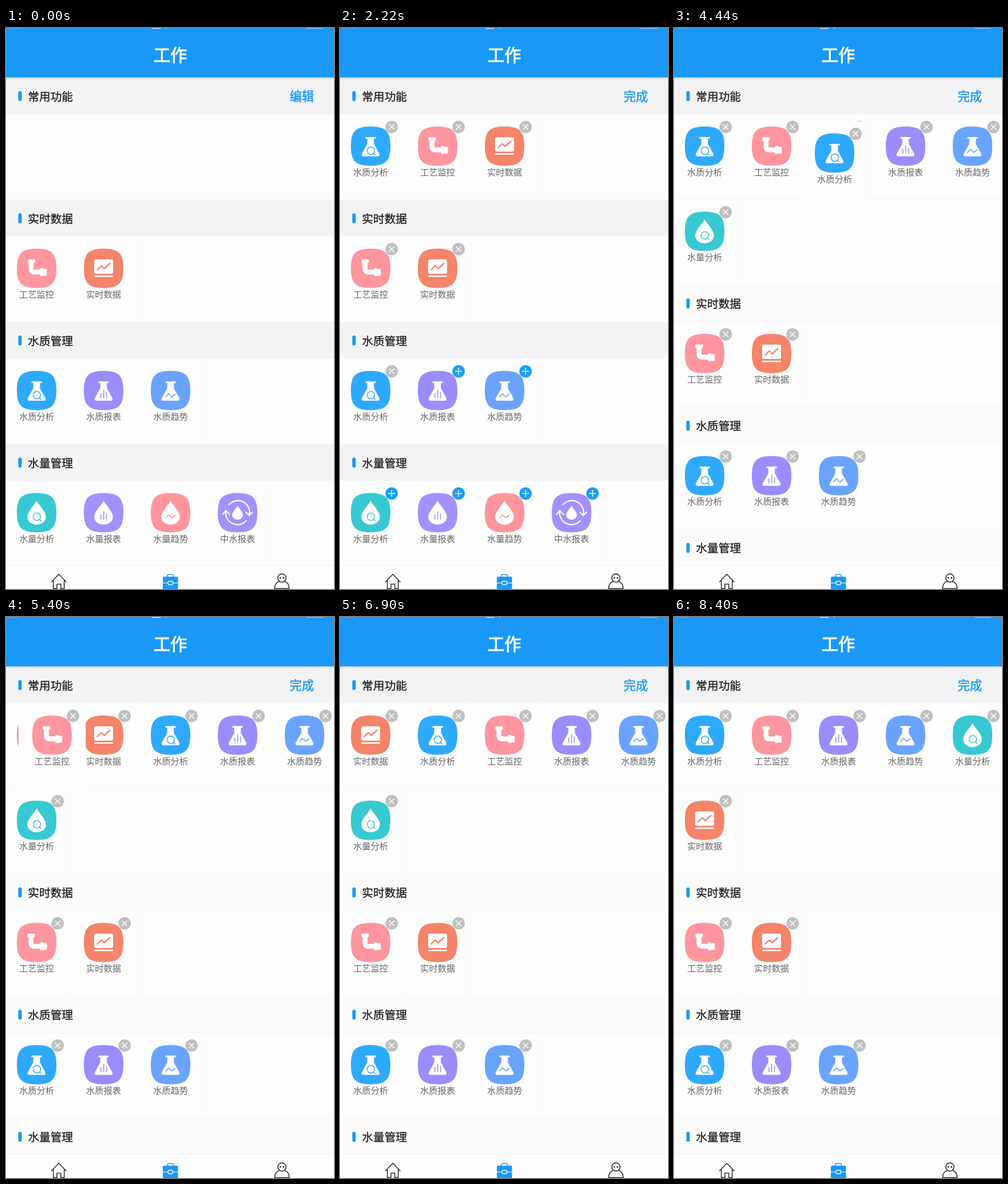
Recreate the animation shown at these times as an HTML page. Size 573 px wide and 978 px high, loop 8.46 s.

```html
<!DOCTYPE html>
<html lang="zh-CN">
<head>
<meta charset="utf-8">
<style>
html, body { margin: 0; width: 100%; height: 100%; overflow: hidden; background: #fdfdfd; }
svg { display: block; width: 573px; height: 978px; font-family: "Noto Sans CJK SC", "Noto Sans CJK", "Noto Sans SC", sans-serif; }
</style>
</head>
<body>
<svg id="stage" viewBox="0 0 573 978"></svg>
<script>
const LOOP = 8460, PITCH = 117, ROW = 148.5, SECTION = 213;
const BLUE = '#1a98f7';
const stage = document.getElementById('stage');

const rect = (x, y, w, h, fill, r = 0) =>
  `<rect x="${x}" y="${y}" width="${w}" height="${h}" rx="${r}" fill="${fill}"/>`;
const line = (d, color, w) =>
  `<path d="${d}" fill="none" stroke="${color}" stroke-width="${w}" stroke-linejoin="round" stroke-linecap="round"/>`;
const shape = (d, fill) => `<path d="${d}" fill="${fill}"/>`;
// `bold` thickens the regular face a little, to a medium weight
const text = (s, x, y, size, fill, anchor = 'start', bold = 0) =>
  `<text x="${x}" y="${y + size * 0.37}" font-size="${size}" fill="${fill}" stroke="${fill}" stroke-width="${bold}" text-anchor="${anchor}">${s}</text>`;
const at = (x, y, body) => `<g transform="translate(${x} ${y})">${body}</g>`;

const TILE = 'M-34.5 0C-34.5-26-26-34.2 0-34.2S34.5-26 34.5 0 26 34.2 0 34.2-34.5 26-34.5 0Z';
const FLASK = 'M-8-16H8Q9.2-16 9.2-14.5T8-13H5.8V-4L15.2 13Q17 17.8 12.5 17.8H-12.5Q-17 17.8-15.2 13L-5.8-4V-13H-8Q-9.2-13-9.2-14.5T-8-16Z';
const DROP = 'M0-21C4-13 16.3-2 16.3 7C16.3 15 9 20.8 0 20.8S-16.3 15-16.3 7C-16.3-2-4-13 0-21Z';

// Marks cut into a flask or a drop
const marks = {
  lens: c => `<circle cx="0.5" cy="8" r="6.5" fill="none" stroke="${c}" stroke-width="1.5"/>` + line('M5.2 12.7L8 15.5', c, 1.5),
  bars: c => line('M-4.7 5V12.5M.2-1V12.5M5 3V12.5', c, 1.6),
  wave: c => line('M-8.5 11L-3.5 5.5L2 11L8 6.5', c, 1.7)
};
const flask = mark => c => shape(FLASK, '#fff') + marks[mark](c);
const drop = mark => c => shape(DROP, '#fff') + at(0, mark === 'wave' ? -2 : -1, marks[mark](c));

const pipe = () =>
  '<path d="M-9.7-11V1.5Q-9.7 6.5-4.5 6.5H12" fill="none" stroke="#fff" stroke-width="8.6"/>' +
  rect(-16, -15.5, 13, 6, '#fff', 1) + rect(6, -.5, 5.5, 14, '#fff', 1) + rect(10.5, 1, 7.3, 12, '#fff', 1.5);
const chart = c =>
  rect(-16.5, -15.5, 33, 25, '#fff', 3) + line('M-11 2.5L-4-4.5L1 .5L11-8.5', c, 2.4) +
  rect(-16.5, 12.5, 33, 2.5, '#fff', 1);
const cycle = () =>
  line('M-15-14A20.5 20.5 0 0 1 20.5 4M14.5-1L20.5 5L26-1', '#fff', 2.2) +
  line('M15 14A20.5 20.5 0 0 1-20.5-3M-26 3L-20.5-4L-14 3', '#fff', 2.2) +
  `<g transform="scale(.58)">${shape(DROP, '#fff')}</g>`;

const items = {
  pipe: ['工艺监控', '#ff959f', pipe],
  chart: ['实时数据', '#f4846a', chart],
  wLens: ['水质分析', '#2fa9fc', flask('lens')],
  wBars: ['水质报表', '#9b8cfb', flask('bars')],
  wWave: ['水质趋势', '#6aa3fd', flask('wave')],
  qLens: ['水量分析', '#37c8d2', drop('lens')],
  qBars: ['水量报表', '#a390fd', drop('bars')],
  qWave: ['水量趋势', '#ff959d', drop('wave')],
  cycle: ['中水报表', '#a390fc', cycle]
};
const sections = [
  ['实时数据', ['pipe', 'chart']],
  ['水质管理', ['wLens', 'wBars', 'wWave']],
  ['水量管理', ['qLens', 'qBars', 'qWave', 'cycle']]
];

const EDIT_AT = 480;
const adds = [
  [1020, 'wLens'], [1440, 'pipe'], [1860, 'chart'],
  [2340, 'wBars'], [2640, 'wWave'], [3240, 'qLens']
];
// The first favourite is carried by (dx, dy) and dropped into slot `to`
const drags = [
  { start: 3960, arrive: 4440, end: 4620, dx: 227, dy: 12, to: 2 },
  { start: 5300, arrive: 5780, end: 6000, dx: 240, dy: -1, to: 2 },
  { start: 7320, arrive: 7800, end: 7980, dx: 0, dy: 149, to: 5 }
];

function badge(kind) {
  if (!kind) return '';
  const add = kind === 'add';
  return at(36.7, -33.5, `<circle r="10.8" fill="${add ? '#1a9df9' : '#bfbfbf'}"/>` +
    line(add ? 'M-5.5 0H5.5M0-5.5V5.5' : 'M-4.3-4.3L4.3 4.3M4.3-4.3L-4.3 4.3', '#fff', 1.5));
}

function cell(id, x, y, kind) {
  const [label, color, icon] = items[id];
  return at(x, y, rect(-58.5, -55, PITCH, ROW, '#fdfdfd') + rect(58, -55, 1, ROW, '#f8f8f8') +
    shape(TILE, color) + icon(color) + text(label, 0, 45, 15.3, '#666', 'middle') + badge(kind));
}

const slot = (i, top) => [53.5 + PITCH * (i % 5), top + 120 + ROW * Math.floor(i / 5)];

function header(title, top, faint) {
  return rect(0, top, 573, 64.5, faint ? '#fbfbfb' : '#f3f3f5') +
    (faint ? rect(0, top + 64, 573, 1, '#f4f4f4') + rect(0, top, 573, 1, '#f8f8f8') : '') +
    rect(21.5, top + 24, 6, 17.5, BLUE, 3) +
    text(title, 38.3, top + 33.5, 19.7, '#222', 'start', .35);
}

const frameTop =
  '<defs><linearGradient id="shade" x2="0" y2="1"><stop stop-color="#c5d3df"/><stop offset="1" stop-color="#f3f3f5" stop-opacity="0"/></linearGradient></defs>' +
  rect(0, 86, 573, 6, 'url(#shade)') + rect(0, 0, 573, 86, BLUE) +
  rect(255, 0, 15, 1.3, '#d5ebfd') + rect(279, 0, 2, 1.3, '#d5ebfd') +
  rect(525, 0, 29, 1.2, '#8fcaf9') + rect(4, 0, 22, 1, '#48aaf5') +
  text('工作', 287, 47.5, 29.3, '#fff', 'middle', .9);

const tabs =
  rect(0, 936, 573, 42, '#fdfdfd') + rect(0, 936, 573, 1, '#f0f0f0') +
  line('M79.5 965.5L92.3 952.3L105 965.5M82.7 963V977.3H89V969.5H95.7V977.3H101.7V963', '#333', 1.6) +
  line('M282 957V954.5Q282 952.8 284 952.8H290.5Q292.5 952.8 292.5 954.5V957', BLUE, 1.6) +
  rect(274, 956.5, 26.5, 22, BLUE, 2) +
  line('M274 967.5H283M291.5 967.5H300.5', '#fff', 1.2) +
  '<rect x="283" y="964.5" width="8.5" height="6" rx="2" fill="none" stroke="#fff" stroke-width="1.3"/>' +
  '<circle cx="482" cy="958.8" r="7.2" fill="none" stroke="#333" stroke-width="1.6"/>' +
  '<circle cx="479.2" cy="958.5" r="1.5" fill="#333"/><circle cx="484.8" cy="958.5" r="1.5" fill="#333"/>' +
  line('M477 965Q469.3 967.5 469.3 977.3H494.7Q494.7 967.5 487 965', '#333', 1.6);

function favourites(t) {
  const list = adds.filter(a => t >= a[0]).map(a => a[1]);
  for (const d of drags) if (t >= d.end) list.splice(d.to, 0, list.shift());
  return list;
}

function draw(t) {
  const edit = t >= EDIT_AT;
  const list = favourites(t);
  const shift = list.length > 5 ? ROW : 0;
  let out = rect(0, 0, 573, 978, '#fdfdfd') + header('常用功能', 86) +
    text(edit ? '完成' : '编辑', 516.7, 119.5, 21.3, BLUE, 'middle', .5);

  list.forEach((id, i) => { out += cell(id, ...slot(i, 86), 'remove'); });
  if (shift) out += rect(0, 298, 573, 1, '#f4f4f4');

  sections.forEach(([title, ids], n) => {
    const top = 86 + SECTION * (n + 1) + shift;
    out += header(title, top, shift > 0);
    ids.forEach((id, i) => {
      out += cell(id, ...slot(i, top), edit && (list.includes(id) ? 'remove' : 'add'));
    });
  });

  const d = drags.find(d => t >= d.start && t < d.end);
  if (d) {
    const p = Math.min(1, (t - d.start) / (d.arrive - d.start));
    const e = p * p * (3 - 2 * p);
    const [x, y] = slot(0, 86);
    out += cell(list[0], x + d.dx * e, y + d.dy * e, 'remove');
  }
  return out + frameTop + tabs;
}

const began = performance.now();
let last = '';
function tick() {
  const t = Math.floor(((performance.now() - began) % LOOP) / 60) * 60;
  const next = draw(t);
  if (next !== last) stage.innerHTML = last = next;
  requestAnimationFrame(tick);
}
tick();
</script>
</body>
</html>
```
